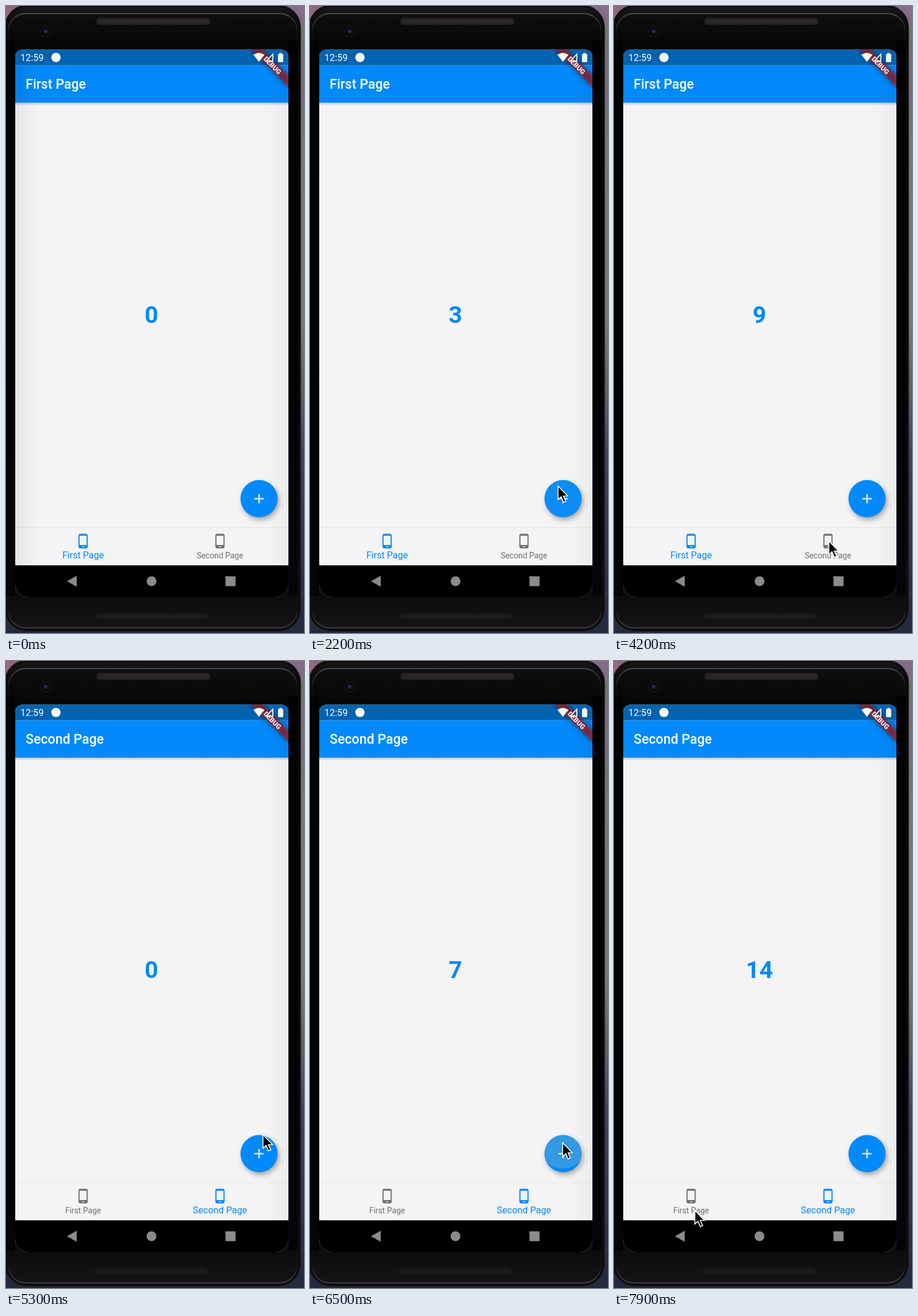
Write an HTML page with a canvas that moves like this. It is 516 px wide and 1084 px high and loops after 8 s.

```html
<!DOCTYPE html>
<html lang="en">
<head>
<meta charset="utf-8">
<title>Counter tabs</title>
<style>
html, body { margin: 0; width: 100%; height: 100%; overflow: hidden; background: #000; }
canvas { display: block; width: 516px; height: 1084px; }
</style>
</head>
<body>
<canvas id="stage" width="516" height="1084"></canvas>
<script>
const ctx = document.getElementById('stage').getContext('2d');
const LOOP = 8000, STEP = 100;
const BLUE = '#0289fb', PAPER = '#f4f3f6';
const FAB = { x: 438.2, y: 851.8, r: 32.2 };
const TAB_TAP = 4400;

// Pointer tip: time, x, y
const POINTER = [
  [300, 530, 700], [900, 417.5, 821.5], [1000, 417.5, 821.5], [1300, 429.5, 830],
  [3850, 429.5, 830], [4200, 372, 925], [4600, 372, 925], [5100, 445, 819],
  [5300, 445, 819], [5500, 437.5, 833], [7530, 437.5, 833], [7830, 140, 950], [8000, 140, 950]
];
const TAPS = [
  ...Array.from({ length: 9 }, (_, i) => 1500 + i * 275),
  ...Array.from({ length: 14 }, (_, i) => 5500 + i * 155)
];

const clamp = v => Math.max(0, Math.min(1, v));
const lerp = (a, b, p) => a + (b - a) * p;
const ease = p => p * p * (3 - 2 * p);

function pointerAt(t) {
  if (t < POINTER[0][0]) return null;
  const i = Math.max(1, POINTER.findIndex(k => k[0] >= t));
  const [a, b] = [POINTER[i - 1], POINTER[i]];
  const p = ease(clamp((t - a[0]) / (b[0] - a[0])));
  return { x: lerp(a[1], b[1], p), y: lerp(a[2], b[2], p) };
}

function gradient(x0, y0, x1, y1, ...stops) {
  const g = ctx.createLinearGradient(x0, y0, x1, y1);
  stops.forEach(([at, color]) => g.addColorStop(at, color));
  return g;
}

function rect(x, y, w, h, fill) {
  ctx.fillStyle = fill;
  ctx.fillRect(x, y, w, h);
}

function round(x, y, w, h, r, fill, stroke, line = 1) {
  ctx.beginPath();
  ctx.roundRect(x, y, w, h, r);
  if (fill) { ctx.fillStyle = fill; ctx.fill(); }
  if (stroke) { ctx.strokeStyle = stroke; ctx.lineWidth = line; ctx.stroke(); }
}

function disc(x, y, r, fill) {
  ctx.beginPath();
  ctx.arc(x, y, r, 0, Math.PI * 2);
  ctx.fillStyle = fill;
  ctx.fill();
}

function poly(points, fill) {
  ctx.beginPath();
  points.forEach(([x, y]) => ctx.lineTo(x, y));
  ctx.closePath();
  if (fill) { ctx.fillStyle = fill; ctx.fill(); }
}

function text(str, x, y, size, weight, color, align = 'left') {
  ctx.font = `${weight} ${size}px Roboto, sans-serif`;
  ctx.textAlign = align;
  ctx.fillStyle = color;
  ctx.fillText(str, x, y);
}

function shadow(color, blur, dx, dy) {
  ctx.shadowColor = color;
  ctx.shadowBlur = blur;
  ctx.shadowOffsetX = dx;
  ctx.shadowOffsetY = dy;
}

function speaker(x, y, w, h, fill, dots) {
  round(x, y, w, h, 4, fill, '#242222');
  for (let i = 4; i < w - 4; i += 3) {
    rect(x + i, y + 3, 1.4, h - 6, dots);
  }
}

function drawPhone() {
  rect(0, 0, 516, 1084, gradient(0, 0, 0, 1084,
    [0, '#8a6b88'], [.05, '#77707a'], [.5, '#7c787e'], [.6, '#66636d'], [.72, '#41415a'], [1, '#24283f']));
  rect(0, 0, 60, 30, gradient(0, 0, 60, 0, [0, '#9b6a80'], [1, '#6e5068']));
  round(-2, -1, 512, 1082, 38, '#0a0a0b', '#222123', 1.5);
  round(0, 2, 508, 1076, 36, gradient(0, 0, 0, 1084,
    [0, '#1b1a1b'], [.02, '#0d0d0e'], [.07, '#060606'], [.5, '#050505'], [.94, '#0c0c0d'], [1, '#161617']));
  round(4, 13, 500, 1062, 30, null, gradient(0, 13, 0, 1075,
    [0, '#5b595b'], [.03, '#131313'], [.5, '#080808'], [.97, '#131313'], [1, '#4a494b']), 1.5);
  rect(0, 60, 16, 960, 'rgba(0,0,0,.6)');
  rect(489, 60, 16, 960, 'rgba(0,0,0,.6)');
  speaker(157, 21, 196, 11, '#262322', '#332f2e');
  speaker(155, 1050, 194, 10, '#171616', '#2a2828');
  disc(69, 44.5, 9.5, '#19191b');
  disc(69, 44.5, 7.8, '#060709');
  disc(69, 44.5, 4.2, '#131b31');
  disc(68, 43.8, 1.6, '#34466f');
}

function drawBanner() {
  ctx.save();
  ctx.translate(489, 75);
  ctx.rotate(Math.PI / 4);
  ctx.filter = 'blur(4.5px)';
  rect(-46, 32.2, 92, 13.8, 'rgba(0,0,0,.5)');
  ctx.filter = 'none';
  rect(-46, 32.2, 92, 13.8, 'rgba(183,28,28,.63)');
  text('DEBUG', 0, 43.2, 11.7, 900, '#f6eef0', 'center');
  ctx.restore();
}

function drawStatus() {
  text('12:59', 25, 95, 16.2, 400, '#fff');
  disc(86.5, 89, 8, '#fff');
  ctx.beginPath();
  ctx.moveTo(438, 96.5);
  ctx.lineTo(428.5, 84.5);
  ctx.quadraticCurveTo(438, 77.5, 447.5, 84.5);
  ctx.closePath();
  ctx.fillStyle = '#fff';
  ctx.fill();
  poly([[450.5, 95.5], [462, 95.5], [462, 83.5]]);
  ctx.strokeStyle = '#fff';
  ctx.lineWidth = 1.8;
  ctx.stroke();
  round(471, 83, 9, 14, 1, '#fff');
  rect(473.5, 81, 4, 3, '#fff');
}

function phoneIcon(x, y, color) {
  round(x - 8, y - 12.6, 16, 25.3, 3.4, color);
  rect(x - 6, y - 9.2, 12, 16.1, PAPER);
  rect(x - 2.3, y + 9.2, 4.6, 1.2, PAPER);
}

function mix(p) {
  const a = [112, 110, 113], b = [2, 137, 251];
  return `rgb(${a.map((v, i) => Math.round(lerp(v, b[i], p)))})`;
}

function tab(label, x, active) {
  const color = mix(active);
  phoneIcon(x, 925, color);
  text(label, x, 954.5, lerp(13.8, 16.1, active), 400, color, 'center');
}

function drawTabs(t) {
  const second = t < TAB_TAP ? 0 : ease(clamp((t - TAB_TAP + 60) / 260));
  rect(16, 901, 473, 1.5, '#e9e8eb');
  rect(16, 902.5, 473, 64.5, PAPER);
  tab('First Page', 133.5, 1 - second);
  tab('Second Page', 370.5, second);

  const age = (t - TAB_TAP) / 500;
  if (age < 0 || age >= 1) return;
  ctx.save();
  ctx.beginPath();
  ctx.rect(16, 902, 473, 65);
  ctx.clip();
  disc(371, 930, 25 + 75 * age, `rgba(2,137,251,${.13 * (1 - age)})`);
  ctx.restore();
}

function drawFab(t) {
  ctx.save();
  shadow('rgba(0,0,0,.32)', 9, 2.5, 4.5);
  disc(FAB.x, FAB.y, FAB.r, BLUE);
  ctx.restore();

  ctx.save();
  ctx.beginPath();
  ctx.arc(FAB.x, FAB.y, FAB.r, 0, Math.PI * 2);
  ctx.clip();
  for (const tap of TAPS) {
    const age = t - tap;
    if (age < 0 || age > 170) continue;
    const at = pointerAt(tap);
    disc(at.x, at.y, 24 + age * .29, `rgba(175,195,165,${.48 * (1 - age / 170)})`);
  }
  ctx.restore();
  rect(FAB.x - 8, FAB.y - 1.1, 16, 2.2, '#fff');
  rect(FAB.x - 1.1, FAB.y - 8, 2.2, 16, '#fff');
}

// Soft darkening along the screen edges
function drawShade(t) {
  rect(450, 102.5, 39, 864.5, gradient(450, 0, 489, 0, [0, 'rgba(0,0,0,0)'], [1, 'rgba(0,0,0,.035)']));
  if (t < 1500) {
    rect(16, 102.5, 38, 864.5, gradient(16, 0, 54, 0, [0, 'rgba(0,0,0,.07)'], [1, 'rgba(0,0,0,0)']));
  }
}

function drawApp(t) {
  const second = t >= TAB_TAP;
  const count = TAPS.filter(tap => tap <= t && (tap > TAB_TAP) === second).length;

  ctx.save();
  ctx.beginPath();
  ctx.roundRect(16, 75.5, 473, 946.5, [12, 12, 22, 22]);
  ctx.clip();
  rect(16, 75, 473, 947, PAPER);
  drawTabs(t);
  rect(16, 167, 473, 5, gradient(0, 167, 0, 172, [0, 'rgba(0,0,0,.22)'], [1, 'rgba(0,0,0,0)']));
  rect(16, 102.5, 473, 64.5, BLUE);
  rect(16, 75, 473, 27.5, '#0363b1');
  drawShade(t);
  drawBanner();
  drawStatus();
  text(second ? 'Second Page' : 'First Page', 34, 143, 23, 500, '#fff');
  text(count, 251.7, 548, 41, 700, BLUE, 'center');
  drawFab(t);

  rect(16, 967, 473, 55, '#000');
  poly([[105.5, 994.5], [122.5, 985], [122.5, 1004]], '#8b8a8c');
  disc(252, 994.5, 8.5, '#8b8a8c');
  round(380, 986, 17.5, 17, 1, '#8b8a8c');
  ctx.restore();
}

function drawPointer(t) {
  const at = pointerAt(t);
  if (!at) return;
  ctx.save();
  ctx.translate(at.x, at.y);
  shadow('rgba(0,0,0,.35)', 3, 0, 1);
  poly([[0, 0], [0, 23.5], [5.4, 18.6], [9.4, 28], [13.4, 26.3], [9.4, 17.2], [16.6, 17]], '#000');
  shadow('transparent', 0, 0, 0);
  ctx.strokeStyle = '#fff';
  ctx.lineWidth = 1.6;
  ctx.stroke();
  ctx.restore();
}

function frame(now) {
  const t = Math.floor((now % LOOP) / STEP) * STEP;
  drawPhone();
  drawApp(t);
  drawPointer(t);
  requestAnimationFrame(frame);
}
frame(0);
</script>
</body>
</html>
```
